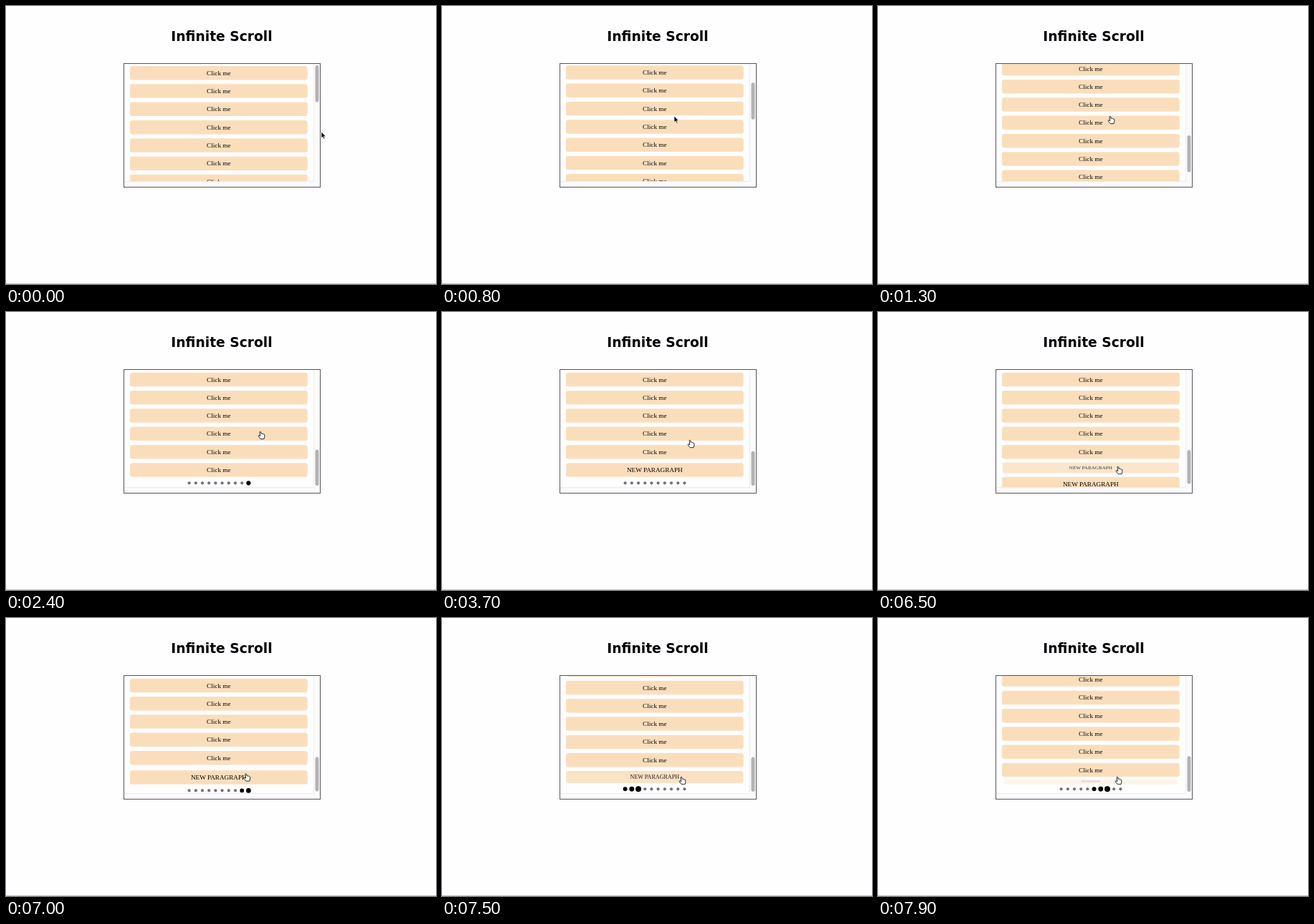
These frames come from a looping animation (600 px wide and 389 px high, 8000 ms). An HTML page:

```html
<!DOCTYPE html>
<html lang="en">
<head>
<meta charset="utf-8">
<title>Infinite Scroll</title>
<style>
  html, body { margin: 0; width: 100%; height: 100%; overflow: hidden; background: #fefdff; }
  svg { display: block; width: 600px; height: 389px; }
  text { text-anchor: middle; }
  h1, .title { font: bold 18.7px "DejaVu Sans", sans-serif; }
  .label { font: 9.2px "Liberation Serif", serif; }
</style>
</head>
<body>
<svg id="stage" viewBox="0 0 600 389">
  <defs><clipPath id="view"><rect x="165" y="81" width="264" height="164"/></clipPath></defs>
  <text class="title" x="301" y="49">Infinite Scroll</text>
  <rect y="388" width="600" height="1" fill="#c4c3c5"/>
  <rect x="164.5" y="80.5" width="274" height="173" fill="#fbfafc" stroke="#555456"/>
  <rect x="165" y="81" width="264" height="164" fill="#fffeff"/>
  <path d="M429.5 81V245.5H165" fill="none" stroke="#ebeaec"/>
  <g clip-path="url(#view)"><g id="rows"></g><g id="dots"></g></g>
  <rect id="thumb" x="431.5" width="5" rx="2.5" fill="#b3b2b4"/>
  <g id="cursor" stroke-linejoin="round">
    <path id="arrow" d="M0 0V8.7L2 6.9L3.4 10L4.8 9.4L3.5 6.4H6.1Z" fill="#000" stroke="#fff" stroke-width=".6"/>
    <path id="hand" d="M-1 .9Q-.2-.3.7.9L1.4 3.5Q2.4 2.8 3 3.7Q4 3.2 4.5 4.1Q5.6 3.9 5.8 5V7.5L5 10.7H.2L-2.6 7.2Q-3.3 5.9-2.2 5.7L-.2 6.7Z" fill="#fff" stroke="#111" stroke-width=".9"/>
  </g>
</svg>
<script>
const LOOP = 8000, STEP = 100;
const PITCH = 25.3, ROW_H = 19.5, TOP = 84, VIEW = 163, LOADER_H = 10.5;
const LEFT = 172.8, WIDTH = 248, TRACK_TOP = 83, TRACK = 160;
const CLICK_ROWS = 20, SHRINK = 727;
const DOT_DELAY = 80, DOT_PERIOD = 1160, DOT_START = 360;

const added = [
  { at: 3400, removed: 6333 },
  { at: 5600, removed: 7413 }
];
const loading = [[1400, 3400], [3600, 5600], [6750, LOOP]];

// [time, value...]
const scrollPath = [[600, 0], [900, 115], [1100, 222], [1300, 309.9], [1400, 340],
  [1500, 353.5], [3599, 353.5], [3600, 378.8]];
const cursorPath = [[100, 440, 176], [400, 385, 168], [600, 330, 156], [800, 324, 154],
  [1900, 324, 154], [2400, 355, 167], [3000, 348, 178], [3400, 346, 179],
  [4500, 346, 179], [4900, 349, 190], [5400, 334, 211.5], [5600, 334, 212],
  [6300, 335, 216], [6900, 335, 216], [7300, 334, 222]];

const byId = id => document.getElementById(id);
const set = (node, attrs) => {
  for (const key in attrs) node.setAttribute(key, attrs[key]);
  return node;
};
const make = (parent, tag, attrs) =>
  parent.appendChild(set(document.createElementNS("http://www.w3.org/2000/svg", tag), attrs));
const clamp = (v, lo, hi) => Math.min(hi, Math.max(lo, v));

function sample(path, t) {
  const next = path.findIndex(p => p[0] > t);
  if (next === 0) return path[0].slice(1);
  if (next < 0) return path[path.length - 1].slice(1);
  const a = path[next - 1], b = path[next], k = (t - a[0]) / (b[0] - a[0]);
  return a.slice(1).map((v, i) => v + (b[i + 1] - v) * k);
}

const rows = Array.from({ length: CLICK_ROWS + added.length }, (_, i) => {
  const group = make(byId("rows"), "g", {});
  const rect = make(group, "rect", { rx: 3.5, fill: "#fadebc" });
  const text = make(group, "text", { class: "label" });
  text.textContent = i < CLICK_ROWS ? "Click me" : "NEW PARAGRAPH";
  return { group, rect, text, life: added[i - CLICK_ROWS] };
});
const dots = Array.from({ length: 10 }, (_, i) =>
  make(byId("dots"), "circle", { cx: 255.6 + i * 9.2 }));

function rowScale(life, t) {
  if (!life) return 1;
  return t < life.at ? 0 : clamp(1 - (t - life.removed) / SHRINK, 0, 1);
}

function drawRows(scales, scroll, x, y) {
  let edge = TOP - (PITCH - ROW_H) / 2 - scroll, hovered = false;
  rows.forEach(({ group, rect, text }, i) => {
    const s = scales[i], h = ROW_H * s, inset = 4.5 * (1 - s);
    const mid = edge + PITCH * s / 2, left = LEFT + inset, width = WIDTH - 2 * inset;
    edge += PITCH * s;
    set(group, { opacity: s, display: s ? "inline" : "none" });
    set(rect, { x: left, y: mid - h / 2, width, height: h, rx: Math.min(3.5, 3.5 * s) });
    set(text, { transform: `translate(${LEFT + WIDTH / 2} ${mid + 3.1 * s}) scale(${s})` });
    if (s && x > left && x < left + width && Math.abs(y - mid) < h / 2) hovered = true;
  });
  return { edge, hovered };
}

function drawDots(t, y) {
  dots.forEach((dot, i) => {
    const phase = t - DOT_START - i * DOT_DELAY;
    const age = (phase % DOT_PERIOD + DOT_PERIOD) % DOT_PERIOD;
    const active = age < 220;
    set(dot, { cy: y, r: active ? 4.1 - age / 160 : 2.1, fill: active ? "#000" : "#756f74" });
  });
}

function draw(t) {
  const scales = rows.map(row => rowScale(row.life, t));
  const busy = loading.some(([from, to]) => t >= from && t < to);
  const height = PITCH * scales.reduce((a, b) => a + b) + (busy ? LOADER_H : 0);
  const scroll = Math.min(sample(scrollPath, t)[0], height - VIEW);
  const [x, y] = sample(cursorPath, t);
  const { edge, hovered } = drawRows(scales, scroll, x, y);

  set(byId("dots"), { display: busy ? "inline" : "none" });
  drawDots(t, edge + 5.7);
  set(byId("thumb"), { y: TRACK_TOP + TRACK * scroll / height, height: TRACK * VIEW / height });
  set(byId("cursor"), { transform: `translate(${x} ${y})` });
  set(byId("arrow"), { display: hovered ? "none" : "inline" });
  set(byId("hand"), { display: hovered ? "inline" : "none" });
}

const start = performance.now();
function tick() {
  const t = (performance.now() - start) % LOOP;
  draw(Math.floor(t / STEP) * STEP);
  requestAnimationFrame(tick);
}
tick();
</script>
</body>
</html>
```
